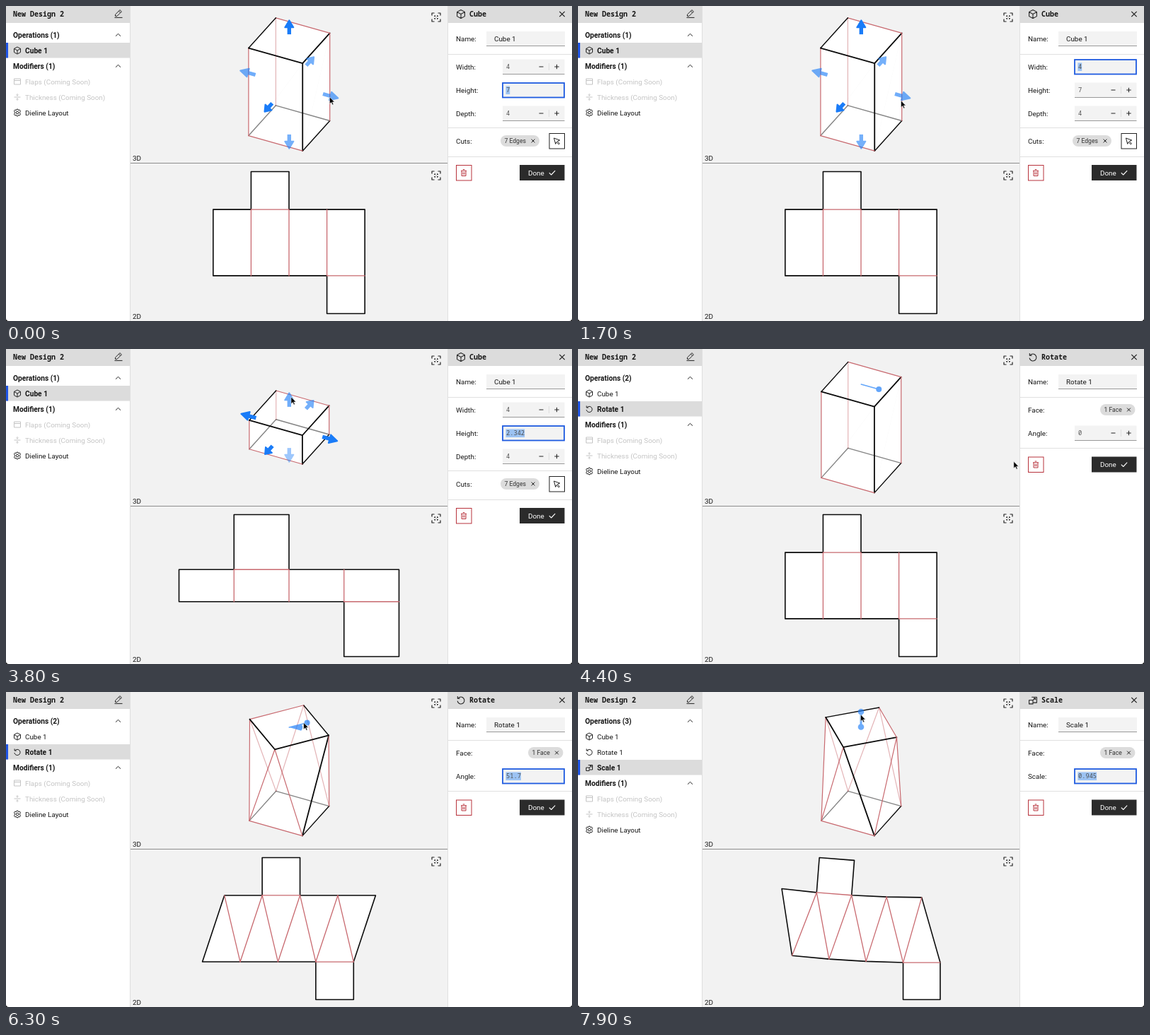
Write an HTML page that moves like this. It is 800 px wide and 446 px high and loops after 8 s.

```html
<!DOCTYPE html>
<html lang="en">
<head>
<meta charset="utf-8">
<title>Box design</title>
<style>
  html, body { margin: 0; width: 100%; height: 100%; overflow: hidden; background: #fff; }
  svg { display: block; width: 800px; height: 446px; }
  text { font: 9.9px Roboto, "Open Sans", sans-serif; fill: #161616; white-space: pre; }
  .bold { font-size: 10.2px; font-weight: 700; }
  .title { font: 600 10px "Noto Sans Mono", "DejaVu Sans Mono", monospace; }
  .value { font: 8.7px "Noto Sans Mono", "DejaVu Sans Mono", monospace; fill: #505050; }
  .small { font-size: 8.6px; fill: #333; }
  .off { fill: #c4c4c4; }
  .white { fill: #fff; }
  .icon { fill: none; stroke: #222; stroke-width: 1; stroke-linejoin: round; }
</style>
</head>
<body>
<svg id="stage" viewBox="0 0 800 446"></svg>
<script>
const LOOP = 8000, STEP = 100;
const BLUE = '#1a7cf8', RED = '#c8696f', INK = '#0a0a0a', GRAY = '#dcdcdc';
const MID = [400.3, 111], SHEET = [400, 335];

// Tracks: [time, value, ...]
const WIDTH = [[300, 4], [900, 6.8], [1000, 6.8], [1600, 4]];
const HEIGHT = [[2100, 7], [2500, 2.9], [2900, 7.164], [3100, 9], [3650, 2.4], [3800, 2.342], [3900, 2.342], [4000, 7]];
const ZOOM = [[1800, 17.72], [2100, 17.42]];
const ANGLE = [[4600, 0], [5100, -50], [5200, -54], [5300, -55], [5500, -42], [6000, 46], [6200, 53], [6300, 51.7], [6400, 51.7], [6500, -45]];
const SCALE = [[7300, 1], [7600, 1.27], [7900, .945]];
const CURSOR = [[0, 457.5, 129], [300, 460, 129], [900, 486, 137], [1000, 486, 137], [1600, 456.5, 134],
  [1800, 456.5, 134], [2100, 402, 22], [2500, 403, 62], [2900, 404, 15], [3100, 404, 3], [3650, 403, 67],
  [3800, 403, 68], [4100, 762, 236], [4250, 762, 236], [4600, 421, 57]];
const CURSOR_END = [[6400, 419, 42], [6700, 762, 163], [6900, 762, 163], [7300, 399.5, 30]];

function track(keys, t) {
  const i = keys.findIndex(k => k[0] > t);
  if (i === 0) return keys[0].slice(1);
  if (i < 0) return keys[keys.length - 1].slice(1);
  const a = keys[i - 1], b = keys[i], u = (t - a[0]) / (b[0] - a[0]);
  return a.slice(1).map((v, j) => v + (b[j + 1] - v) * u);
}
const num = (v, n) => String(+v.toFixed(n));

// SVG helpers
const pts = list => list.map(p => p[0].toFixed(2) + ',' + p[1].toFixed(2)).join(' ');
const poly = (list, fill, extra = '') => `<polygon points="${pts(list)}" fill="${fill}" ${extra}/>`;
const line = (a, b, color, w, o = 1) =>
  `<polyline points="${pts([a, b])}" fill="none" stroke="${color}" stroke-width="${w}" stroke-linecap="round" opacity="${o}"/>`;
const rect = (x, y, w, h, fill, extra = '') => `<rect x="${x}" y="${y}" width="${w}" height="${h}" fill="${fill}" ${extra}/>`;
const dot = (p, r, fill, extra = '') => `<circle cx="${p[0]}" cy="${p[1]}" r="${r}" fill="${fill}" ${extra}/>`;
const text = (x, y, s, cls = '') => `<text x="${x}" y="${y + 3.5}" class="${cls}">${s}</text>`;
const icon = (name, x, y, color = '#222', w = 1) =>
  `<path class="icon" d="${ICONS[name]}" transform="translate(${x} ${y})" style="stroke:${color};stroke-width:${w}"/>`;

// Icons are drawn around their own centre
const ICONS = {
  cube: 'M0-5L4.5-2.6V2.6L0 5L-4.5 2.6V-2.6ZM-4.5-2.6L0 0L4.5-2.6M0 0V5',
  rotate: 'M-3.2-2.2A4.1 4.1 0 1 1-4.1 1M-3.9-4.6V-1.9H-1.2',
  scale: 'M-1.5-3.5H4.5V3H.5M-4.5 0H0V4.5H-4.5ZM0 0L3-2.3M.8-2.3H3V-.2',
  flaps: 'M-4.5-4H4.5V4H-4.5ZM-4.5-1.5H4.5',
  thick: 'M-4.5 0H4.5M0-5V-2M-1.5-3.2L0-1.8L1.5-3.2M0 5V2M-1.5 3.2L0 1.8L1.5 3.2',
  gear: 'M-1-4.8H1L1.5-3.4L3.4-3.9L4.5-2.2L3.6-.9V.9L4.5 2.2L3.4 3.9L1.5 3.4L1 4.8H-1L-1.5 3.4L-3.4 3.9L-4.5 2.2L-3.6.9V-.9L-4.5-2.2L-3.4-3.9L-1.5-3.4ZM1.8 0A1.8 1.8 0 1 1-1.8 0A1.8 1.8 0 1 1 1.8 0',
  up: 'M-3.5 1.7L0-1.7L3.5 1.7',
  pencil: 'M-4.5 3.3V1L2-5.4L4.4-3.1L-2 3.3ZM.4-3.8L2.7-1.5M-5.5 5.4H5.5',
  close: 'M-3.7-3.7L3.7 3.7M3.7-3.7L-3.7 3.7',
  tiny: 'M-2.4-2.4L2.4 2.4M2.4-2.4L-2.4 2.4',
  check: 'M-4.2.2L-1.3 3L4.2-2.8',
  minus: 'M-3 0H3',
  plus: 'M-3.2 0H3.2M0-3.2V3.2',
  trash: 'M-4-2.7H4M-3-2.7V4.5H3V-2.7M-1.3-4.5H1.3M-1-.7V2.7M1-.7V2.7',
  pointer: 'M-4-4L4.2-1L.8.6L4 4L2.8 5L-.4 1.6L-1.8 4.4Z',
  focus: 'M-6-2.5V-6H-2.5M2.5-6H6V-2.5M6 2.5V6H2.5M-2.5 6H-6V2.5M-1.6-2.8V-1.6H-2.8M1.6-2.8V-1.6H2.8M1.6 2.8V1.6H2.8M-1.6 2.8V1.6H-2.8M-.3 0H.3'
};

// Solid: corners run front, right, back, left
function makeBox(w, h, d, deg, scale) {
  const r = deg * Math.PI / 180, c = Math.cos(r) * scale, s = Math.sin(r) * scale;
  const base = [[w, -d], [w, d], [-w, d], [-w, -d]].map(p => [p[0] / 2, p[1] / 2]);
  return {
    w, h, d, deg, scale,
    low: base.map(([a, b]) => [a, b, -h / 2]),
    top: base.map(([a, b]) => [a * c - b * s, a * s + b * c, h / 2])
  };
}
const project = (k, [a, b, y]) => [MID[0] + k * (1.077 * a + .543 * b), MID[1] + k * (.305 * a - .603 * b - y)];
const facing = ([a, b, c]) => (b[0] - a[0]) * (c[1] - a[1]) - (b[1] - a[1]) * (c[0] - a[0]) < 0;

function drawSolid(box, k) {
  const P = box.low.map(p => project(k, p)), Q = box.top.map(p => project(k, p));
  const left = box.deg <= 0;
  const sides = P.map((p, i) => {
    const j = (i + 1) % 4;
    const tri = left ? [[p, P[j], Q[j]], [p, Q[j], Q[i]]] : [[p, P[j], Q[i]], [P[j], Q[j], Q[i]]];
    return { tri, front: tri.map(facing) };
  });
  let fill = poly(Q, '#fff'), back = '', front = '';
  const edge = (a, b, cut, f, g) => {
    const both = f && g, seen = f || g;
    const svg = line(a, b, cut ? INK : RED, cut ? (both ? 1.8 : 1.4) : 1.2, seen ? 1 : .5);
    if (seen) front += svg; else back += svg;
  };
  sides.forEach((s, i) => {
    const j = (i + 1) % 4, prev = sides[(i + 3) % 4];
    s.tri.forEach((t, n) => { if (s.front[n]) fill += poly(t, '#fff'); });
    edge(P[i], P[j], i !== 3, false, s.front[0]);
    edge(P[i], Q[i], i === 0, s.front[left ? 1 : 0], prev.front[left ? 0 : 1]);
    if (box.deg) edge(left ? P[i] : P[j], left ? Q[j] : Q[i], false, s.front[0], s.front[1]);
    edge(Q[i], Q[j], i !== 1, true, s.front[1]);
  });
  return fill + back + front;
}

function arrow(c, u, opacity) {
  const at = n => [c[0] + u[0] * n, c[1] + u[1] * n];
  const len = Math.hypot(u[0], u[1]), n = [-u[1] / len * 6, u[0] / len * 6];
  const b = at(1.05), tip = at(1.62);
  return `<g opacity="${opacity}">` + `<polyline points="${pts([at(.5), at(1.1)])}" stroke="${BLUE}" stroke-width="5.4"/>` +
    poly([[b[0] + n[0], b[1] + n[1]], tip, [b[0] - n[0], b[1] - n[1]]], BLUE, `stroke="${BLUE}" stroke-width="2" stroke-linejoin="round"`) + '</g>';
}

function drawArrows(box, k, active) {
  const half = [box.w / 2, box.d / 2, box.h / 2];
  let out = '';
  for (let axis = 0; axis < 3; axis++) for (const sign of [-1, 1]) {
    const c = [0, 0, 0], e = [0, 0, 0];
    c[axis] = sign * half[axis];
    e[axis] = sign;
    const far = axis === 1 && sign > 0 || axis === 2 && sign < 0;
    const p = project(k, e);
    const dim = axis === active;
    out += arrow(project(k, c), [p[0] - MID[0], p[1] - MID[1]], far ? (dim ? .42 : .6) : dim ? .62 : 1);
  }
  return out;
}

const onTop = (box, k, deg, r) =>
  project(k, [r * Math.cos(deg * Math.PI / 180), r * Math.sin(deg * Math.PI / 180), box.h / 2]);

function drawDial(box, k, deg) {
  const fan = [onTop(box, k, 0, 0)];
  for (let i = 0; i <= 12; i++) fan.push(onTop(box, k, deg * i / 12, .9));
  const knob = onTop(box, k, deg, 1.33);
  return `<g opacity=".68">${poly(fan, BLUE)}${line(fan[0], knob, BLUE, 1.6)}${dot(knob, 4, BLUE)}</g>`;
}

function drawSlider(scale) {
  const tip = [400, 50 - 23.3 * scale];
  return `<g opacity=".64">${line([400, 49.5], tip, BLUE, 3)}${dot([400, 49.5], 4.3, BLUE)}${dot(tip, 4.3, BLUE)}</g>`;
}

// Flat net: the point left of a→b at the given distances
function third(a, b, la, lb) {
  const dx = b[0] - a[0], dy = b[1] - a[1], len = Math.hypot(dx, dy);
  const x = (la * la - lb * lb + len * len) / (2 * len), y = Math.sqrt(Math.max(0, la * la - x * x));
  return [a[0] + (dx * x + dy * y) / len, a[1] + (dy * x - dx * y) / len];
}

function drawNet(box) {
  const P = [], Q = [], left = box.deg <= 0;
  const gap = (a, b) => Math.hypot(a[0] - b[0], a[1] - b[1], a[2] - b[2]);
  const L = i => box.low[i % 4], T = i => box.top[i % 4];
  P[3] = [0, 0];
  P[4] = [box.w, 0];
  if (left) {
    Q[4] = third(P[3], P[4], gap(L(3), T(4)), gap(L(4), T(4)));
    Q[3] = third(P[3], Q[4], gap(L(3), T(3)), gap(T(4), T(3)));
  } else {
    Q[3] = third(P[3], P[4], gap(L(3), T(3)), gap(L(4), T(3)));
    Q[4] = third(Q[3], P[4], gap(T(3), T(4)), gap(L(4), T(4)));
  }
  for (let i = 2; i >= 0; i--) {
    const j = i + 1;
    const pi = [gap(L(i), L(j)), gap(L(i), T(j))], qi = [gap(L(j), T(i)), gap(T(j), T(i))];
    if (left) {
      P[i] = third(P[j], Q[j], pi[0], pi[1]);
      Q[i] = third(P[i], Q[j], gap(L(i), T(i)), qi[1]);
    } else {
      Q[i] = third(P[j], Q[j], qi[0], qi[1]);
      P[i] = third(P[j], Q[i], pi[0], gap(L(i), T(i)));
    }
  }
  const flap = (a, b, depth) => {
    const dx = b[0] - a[0], dy = b[1] - a[1], n = depth / Math.hypot(dx, dy);
    return [a, [a[0] + dy * n, a[1] - dx * n], [b[0] + dy * n, b[1] - dx * n], b];
  };
  const outline = [P[0], Q[0], ...flap(Q[1], Q[2], box.d * box.scale), Q[3], Q[4], ...flap(P[4], P[3], box.d), P[2], P[1]];
  const xs = outline.map(p => p[0]), ys = outline.map(p => p[1]);
  const x0 = Math.min(...xs), x1 = Math.max(...xs), y0 = Math.min(...ys), y1 = Math.max(...ys);
  const k = Math.min(201 / (y1 - y0), 416 / (x1 - x0));
  const fit = p => [SHEET[0] + (p[0] - (x0 + x1) / 2) * k, SHEET[1] + (p[1] - (y0 + y1) / 2) * k];
  const fold = (a, b) => line(fit(a), fit(b), RED, 1.3);
  let out = poly(outline.map(fit), '#fff', `stroke="${INK}" stroke-width="1.6" stroke-linejoin="round"`);
  out += fold(Q[1], Q[2]) + fold(P[3], P[4]);
  for (let i = 1; i < 4; i++) out += fold(P[i], Q[i]);
  if (box.deg) for (let i = 0; i < 4; i++) out += left ? fold(P[i], Q[i + 1]) : fold(P[i + 1], Q[i]);
  return out;
}

// Panels
const OPS = [['cube', 'Cube'], ['rotate', 'Rotate'], ['scale', 'Scale']];

function drawLeft(count) {
  let out = rect(0, 0, 175.5, 446, '#fff') + rect(0, 0, 175.5, 24, GRAY) + text(10, 11.5, 'New Design 2', 'title') + icon('pencil', 159, 11);
  const head = (y, name, n) => text(10, y, `${name} (${n})`, 'bold') + icon('up', 158.5, y);
  out += head(41, 'Operations', count);
  OPS.slice(0, count).forEach(([id, name], i) => {
    const y = 63 + 22 * i, on = i === count - 1;
    if (on) out += rect(0, y - 11, 175.5, 21.5, GRAY) + rect(0, y - 11, 3, 21.5, '#1f55e6');
    out += icon(id, 16, y) + text(27, y, name + ' 1', on ? 'bold' : '');
  });
  const y = 63 + 22 * count;
  out += head(y, 'Modifiers', 1);
  out += icon('flaps', 16, y + 22, '#c4c4c4') + text(27, y + 22, 'Flaps (Coming Soon)', 'off');
  out += icon('thick', 16, y + 44, '#c4c4c4') + text(27, y + 44, 'Thickness (Coming Soon)', 'off');
  return out + icon('gear', 16, y + 66) + text(27, y + 66, 'Dieline Layout');
}

function field(y, label, value, focused) {
  let out = text(636, y, label + ':') + rect(702, y - 10.5, 87.5, 21, '#f3f3f3');
  if (focused) {
    out += rect(702, y - 10, 87, 20.5, 'none', 'stroke="#1f5be0" stroke-width="1.8"');
    out += rect(706.5, y - 5.5, value.length * 5.22 + .5, 11.5, '#9cc3f3');
  } else {
    out += rect(702, y + 10, 87.5, 1, '#999') + rect(767, y - 5, 1, 10, '#dedede');
    out += icon('minus', 756.5, y) + icon('plus', 778.5, y);
  }
  return out + text(707, y - .3, value, 'value');
}

const chip = (x, y, w, label) => rect(x, y - 8, w, 16, GRAY, 'rx="8"') + text(x + 5.5, y - .4, label, 'small') + icon('tiny', x + w - 9, y);
const rule = y => rect(625, y, 175, 1, '#e0e0e0');

function drawRight(count, values, focus) {
  const [id, name] = OPS[count - 1];
  let out = rect(624.5, 0, 175.5, 446, '#fff') + rect(624, 0, 1, 446, '#e0e0e0') + rect(624.5, 0, 175.5, 24, GRAY);
  out += `<g transform="translate(643 11.5) scale(1.2)">${icon(id, 0, 0, '#222', .9)}</g>`;
  out += text(655, 11.5, name, 'title') + icon('close', 786, 11.5, '#222', 1.2);
  out += text(636, 46, 'Name:') + rect(679, 36, 111, 21, '#f3f3f3') + rect(679, 56, 111, 1, '#999') + text(690, 46, name + ' 1') + rule(68);
  let y = 163.5;
  if (count > 1) out += text(636, 86, 'Face:') + chip(738, 86, 49.5, '1 Face') + rule(140);
  else {
    y = 236;
    out += rule(172) + text(636, 191, 'Cuts:') + chip(699, 191, 55, '7 Edges') + rule(213);
    out += rect(768, 180.5, 21.5, 21.5, '#fff', 'stroke="#222"') + icon('pointer', 778.5, 191);
  }
  values.forEach(([label, v], i) => { out += field(count > 1 ? 119 : 86 + 33 * i, label, v, label === focus); });
  out += rect(636.5, y - 10.5, 21.5, 21.5, '#fff', 'stroke="#b8323c"') + icon('trash', 647, y, '#b8323c');
  return out + rect(726, y - 11, 63.5, 22, '#2b2b2b') + text(738, y, 'Done', 'white') + icon('check', 772, y, '#fff', 1.1);
}

function focusAt(t) {
  const list = [[300, 'Height'], [2100, 'Width'], [4300, 'Height'], [4500, ''], [7000, 'Angle'], [7300, ''], [LOOP, 'Scale']];
  return list.find(f => t < f[0])[1];
}

function frame(t) {
  const [w] = track(WIDTH, t), [h] = track(HEIGHT, t), [k] = track(ZOOM, t);
  const [deg] = track(ANGLE, t), [scale] = track(SCALE, t);
  const count = t < 4300 ? 1 : t < 7000 ? 2 : 3;
  const box = makeBox(w, h, 4, deg, scale);
  const values = [
    [['Width', num(w, 3)], ['Height', num(h, 3)], ['Depth', '4']],
    [['Angle', num(deg, 1)]],
    [['Scale', num(scale, 3)]]
  ][count - 1];

  let tip = track(t < 6400 ? CURSOR : CURSOR_END, t);
  if (t >= 4600 && t < 6400) {
    const knob = onTop(box, k, deg, 1.33);
    tip = [knob[0] - 5, knob[1]];
  } else if (t >= 7300) tip = [399.5, 54 - 23.3 * scale];

  const handles = count === 1 ? drawArrows(box, k, t < 1900 ? 0 : 2) : count === 2 ? drawDial(box, k, deg) : drawSlider(scale);
  return rect(0, 0, 800, 446, '#f2f2f2') + drawSolid(box, k) + handles + drawNet(box) +
    rect(175.5, 222, 449, 1, '#8d8d8d') + text(179, 215, '3D') + text(179, 439, '2D') +
    icon('focus', 608, 16, '#222', 1.2) + icon('focus', 608, 240, '#222', 1.2) +
    drawLeft(count) + rect(175, 0, 1, 446, '#dedede') + drawRight(count, values, focusAt(t)) +
    '<path d="M0 446V442Q0 446 4 446ZM800 446V442Q800 446 796 446Z"/>' +
    `<path d="M0 0V9.5L2.3 7.4L3.9 10.9L5.4 10.2L3.8 6.9H6.8Z" transform="translate(${tip[0]} ${tip[1]})" stroke="#fff" stroke-width=".5"/>`;
}

const stage = document.getElementById('stage'), start = performance.now();
let shown = -1;
function tick() {
  const step = Math.floor((performance.now() - start) % LOOP / STEP);
  if (step !== shown) stage.innerHTML = frame((shown = step) * STEP);
  requestAnimationFrame(tick);
}
tick();
</script>
</body>
</html>
```
